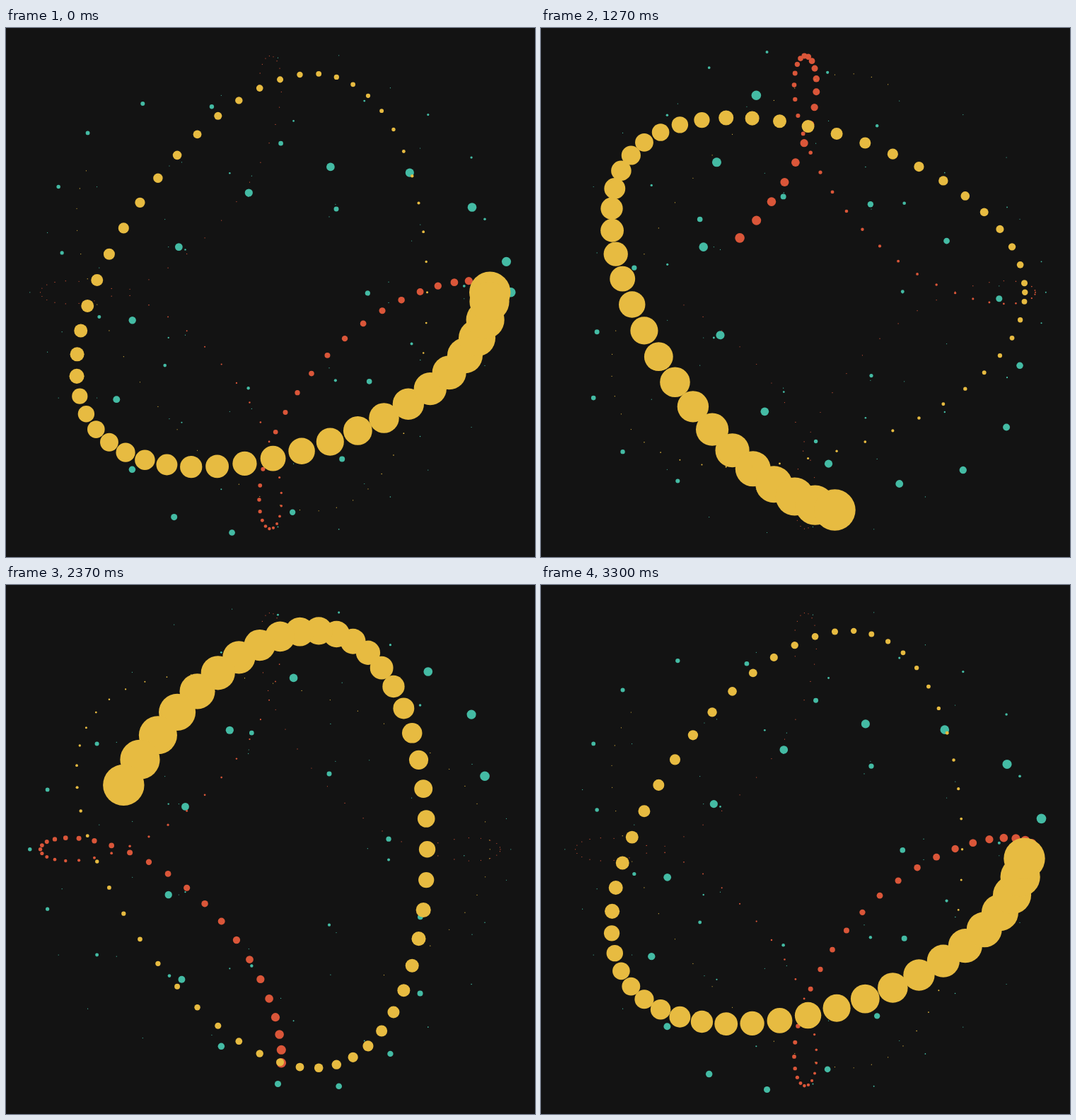
Animation of 748x748 px, one loop 3330 ms. Source, as an HTML page without scripts:

```html
<!DOCTYPE html>
<html lang="en">
<head>
<meta charset="utf-8">
<title>Three orbits</title>
<style>
  @property --age { syntax: "<number>"; inherits: false; initial-value: 0; }

  html, body { margin: 0; width: 100%; height: 100%; overflow: hidden; background: #131313; }
  svg { display: block; width: 748px; height: 748px; }

  /* Each curve is the sum of two rotations: radius a at speed p, radius b at speed q. */
  .teal { --p: 3; --a: 7 / 3; --q: -7; --b: 16 / 3; --size: 6.8px; fill: #44bba4; }
  .red  { --p: 1; --a: 5; --q: -3; --b: 7 / 3; --size: 6.8px; fill: #da5639; }
  .gold { --p: 2; --a: 6; --q: -3; --b: 1; --size: 29.2px; fill: #e7bb41; }

  /* A dot's step is its row (tens) plus its place in the row (ones). */
  .curve > g { --tens: 0; }
  .curve > :nth-child(2) { --tens: 1; }
  .curve > :nth-child(3) { --tens: 2; }
  .curve > :nth-child(4) { --tens: 3; }
  .curve > :nth-child(5) { --tens: 4; }
  .curve > :nth-child(6) { --tens: 5; }
  .curve > :nth-child(7) { --tens: 6; }
  .curve > :nth-child(8) { --tens: 7; }
  .curve > :nth-child(9) { --tens: 8; }
  .curve > :nth-child(10) { --tens: 9; }
  circle { --ones: 0; }
  circle:nth-child(2) { --ones: 1; }
  circle:nth-child(3) { --ones: 2; }
  circle:nth-child(4) { --ones: 3; }
  circle:nth-child(5) { --ones: 4; }
  circle:nth-child(6) { --ones: 5; }
  circle:nth-child(7) { --ones: 6; }
  circle:nth-child(8) { --ones: 7; }
  circle:nth-child(9) { --ones: 8; }
  circle:nth-child(10) { --ones: 9; }

  circle {
    --step: (var(--tens) * 10 + var(--ones));
    --angle: (max(0, var(--step) - 0.5) * 360deg / 99);
    cx: calc(373.8px + 44.35px * (var(--a) * cos(var(--p) * var(--angle)) + var(--b) * cos(var(--q) * var(--angle))));
    cy: calc(373.8px - 45.6px * (var(--a) * sin(var(--p) * var(--angle)) + var(--b) * sin(var(--q) * var(--angle))));
    /* Dots shrink cubically and vanish after 80 steps. */
    r: max(0.6px, var(--size) * pow(1 - var(--age) / 80, 3));
    opacity: calc(80 - var(--age));
    animation: age 3330ms steps(100) infinite;
    animation-delay: calc((var(--step) - 100) * 33.3ms - 4ms);
  }
  @keyframes age { from { --age: 0; } to { --age: 100; } }
</style>
</head>
<body>
<svg viewBox="0 0 748 748">
  <g class="curve teal">
    <g><circle/><circle/><circle/><circle/><circle/><circle/><circle/><circle/><circle/><circle/></g>
    <g><circle/><circle/><circle/><circle/><circle/><circle/><circle/><circle/><circle/><circle/></g>
    <g><circle/><circle/><circle/><circle/><circle/><circle/><circle/><circle/><circle/><circle/></g>
    <g><circle/><circle/><circle/><circle/><circle/><circle/><circle/><circle/><circle/><circle/></g>
    <g><circle/><circle/><circle/><circle/><circle/><circle/><circle/><circle/><circle/><circle/></g>
    <g><circle/><circle/><circle/><circle/><circle/><circle/><circle/><circle/><circle/><circle/></g>
    <g><circle/><circle/><circle/><circle/><circle/><circle/><circle/><circle/><circle/><circle/></g>
    <g><circle/><circle/><circle/><circle/><circle/><circle/><circle/><circle/><circle/><circle/></g>
    <g><circle/><circle/><circle/><circle/><circle/><circle/><circle/><circle/><circle/><circle/></g>
    <g><circle/><circle/><circle/><circle/><circle/><circle/><circle/><circle/><circle/><circle/></g>
  </g>
  <g class="curve red">
    <g><circle/><circle/><circle/><circle/><circle/><circle/><circle/><circle/><circle/><circle/></g>
    <g><circle/><circle/><circle/><circle/><circle/><circle/><circle/><circle/><circle/><circle/></g>
    <g><circle/><circle/><circle/><circle/><circle/><circle/><circle/><circle/><circle/><circle/></g>
    <g><circle/><circle/><circle/><circle/><circle/><circle/><circle/><circle/><circle/><circle/></g>
    <g><circle/><circle/><circle/><circle/><circle/><circle/><circle/><circle/><circle/><circle/></g>
    <g><circle/><circle/><circle/><circle/><circle/><circle/><circle/><circle/><circle/><circle/></g>
    <g><circle/><circle/><circle/><circle/><circle/><circle/><circle/><circle/><circle/><circle/></g>
    <g><circle/><circle/><circle/><circle/><circle/><circle/><circle/><circle/><circle/><circle/></g>
    <g><circle/><circle/><circle/><circle/><circle/><circle/><circle/><circle/><circle/><circle/></g>
    <g><circle/><circle/><circle/><circle/><circle/><circle/><circle/><circle/><circle/><circle/></g>
  </g>
  <g class="curve gold">
    <g><circle/><circle/><circle/><circle/><circle/><circle/><circle/><circle/><circle/><circle/></g>
    <g><circle/><circle/><circle/><circle/><circle/><circle/><circle/><circle/><circle/><circle/></g>
    <g><circle/><circle/><circle/><circle/><circle/><circle/><circle/><circle/><circle/><circle/></g>
    <g><circle/><circle/><circle/><circle/><circle/><circle/><circle/><circle/><circle/><circle/></g>
    <g><circle/><circle/><circle/><circle/><circle/><circle/><circle/><circle/><circle/><circle/></g>
    <g><circle/><circle/><circle/><circle/><circle/><circle/><circle/><circle/><circle/><circle/></g>
    <g><circle/><circle/><circle/><circle/><circle/><circle/><circle/><circle/><circle/><circle/></g>
    <g><circle/><circle/><circle/><circle/><circle/><circle/><circle/><circle/><circle/><circle/></g>
    <g><circle/><circle/><circle/><circle/><circle/><circle/><circle/><circle/><circle/><circle/></g>
    <g><circle/><circle/><circle/><circle/><circle/><circle/><circle/><circle/><circle/><circle/></g>
  </g>
</svg>
</body>
</html>
```
